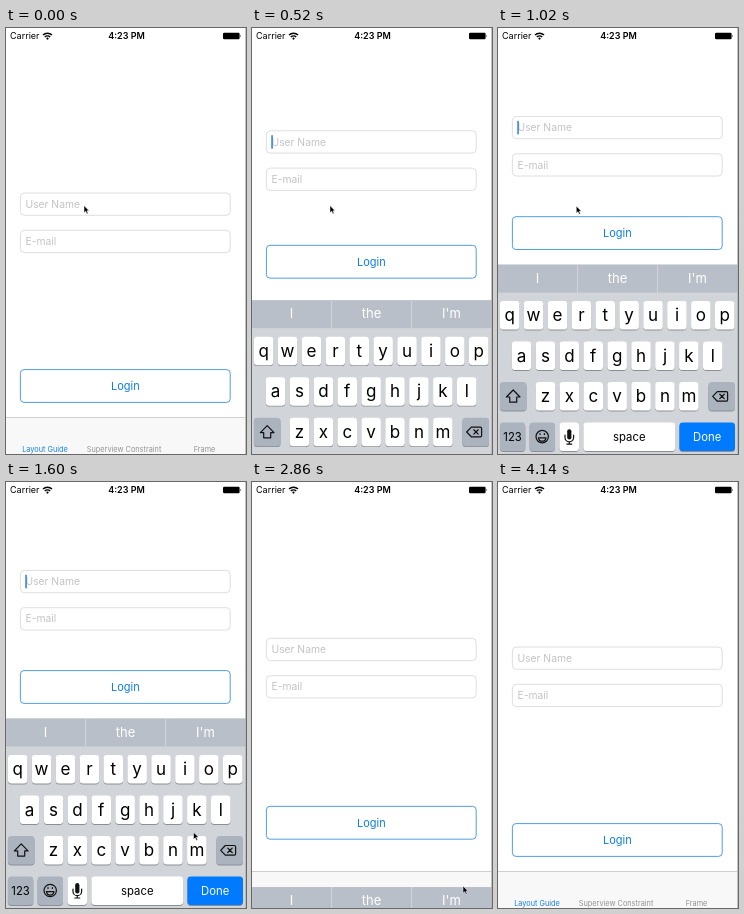
Write an HTML page that moves like this. It is 240x426 px and loops after 4.3 s.

```html
<!DOCTYPE html>
<html lang="en">
<head>
<meta charset="utf-8">
<title>Login form following the keyboard</title>
<style>
html, body { margin: 0; height: 100%; overflow: hidden; background: #fff; }
svg { display: block; width: 100vw; height: 100vh; font-family: Inter, Roboto, "Liberation Sans", sans-serif; }
.mid { text-anchor: middle; }
.hint { font-size: 10.3px; fill: #c3c3c8; }
.field { fill: #fff; stroke: #d6d6d6; stroke-width: .8; }
.tab { font-size: 7.35px; fill: #929292; }
.word { font-size: 13px; fill: #fff; }
.letter { font-size: 17px; }
.label { font-size: 11.3px; }
.icon { fill: none; stroke: #111; stroke-width: 1.2; stroke-linejoin: round; stroke-linecap: round; }
</style>
</head>
<body>
<svg viewBox="0 0 240 426">
  <rect width="240" height="426" fill="#fff"/>

  <!-- status bar -->
  <text x="4" y="11.2" font-size="9">Carrier</text>
  <g fill="none" stroke="#000" stroke-width="1.4">
    <path d="M37 7.1a6.3 6.3 0 0 1 9 0M38.8 9a3.8 3.8 0 0 1 5.4 0"/>
  </g>
  <circle cx="41.5" cy="10.6" r="1.1"/>
  <text class="mid" x="120.5" y="11.2" font-size="9" font-weight="600">4:23 PM</text>
  <rect x="217" y="4.7" width="16.6" height="6.6" rx="1.2"/>
  <path d="M234.2 6.7q1.4 1.3 0 2.6z"/>

  <!-- form -->
  <g id="fields">
    <rect class="field" x="14.4" y="165" width="209.8" height="22.3" rx="4"/>
    <text class="hint" x="19.5" y="179.8">User Name</text>
    <rect class="field" x="14.4" y="202.3" width="209.8" height="22.3" rx="4"/>
    <text class="hint" x="19.5" y="217.1">E-mail</text>
    <rect id="caret" x="19.3" y="169.4" width="1.5" height="13.5" fill="#2b7de0"/>
  </g>
  <g id="login">
    <rect x="14.4" y="341.6" width="209.8" height="32.8" rx="3.6" fill="#fff" stroke="#3c94e0" stroke-width=".9"/>
    <text class="mid" x="119.3" y="362" font-size="11" fill="#0f7ee0">Login</text>
  </g>

  <!-- tab bar -->
  <rect y="389" width="240" height="37" fill="#f8f8f8"/>
  <rect y="389" width="240" height=".7" fill="#bdbdbd"/>
  <g class="mid">
    <text class="tab" x="39" y="423.7" style="fill:#1a82e2">Layout Guide</text>
    <text class="tab" x="118" y="423.7">Superview Constraint</text>
    <text class="tab" x="198.5" y="423.7">Frame</text>
  </g>

  <g id="keyboard">
    <rect width="240" height="192" fill="#d1d5da"/>
    <rect width="240" height="28" fill="#b9bfc8"/>
    <path d="M79.6 0v28M159.6 0v28" stroke="#d3d7dc" stroke-width=".9"/>
    <g id="keys" class="mid"></g>
    <g class="icon">
      <path d="M15.2 125.4l-6.8 7h3.3v5.2h7v-5.2h3.3z"/>
      <path d="M219.3 127h9q1.3 0 1.3 1.3v7q0 1.3-1.3 1.3h-9l-4.6-4.8zM221.8 129.6l4.4 4.4m0-4.4l-4.4 4.4"/>
      <circle cx="44.2" cy="172" r="6.2"/>
      <path d="M40.4 173.2h7.6q-.6 3.4-3.8 3.4t-3.8-3.4zM42 169v1M46.4 169v1"/>
      <path d="M67 170.5v2.4a4.3 4.3 0 0 0 8.6 0v-2.4M71.3 177.3v2.2M68.8 179.5h5"/>
    </g>
    <rect x="69.2" y="164.6" width="4.2" height="10.4" rx="2.1" fill="#111"/>
  </g>

  <rect x="239.2" y="0" width=".8" height="426" fill="#b4b4b6"/>
  <path id="pointer" d="M0 0v7.2l1.7-1.5 1.2 2.6 1.2-.6-1.2-2.5h2.2z" fill="#000" stroke="#fff" stroke-width=".5"/>
</svg>
<script>
const LOOP = 4300, SHOW = 293, HIDE = 2584;
const $ = id => document.getElementById(id);
const clamp = v => Math.min(1, Math.max(0, v));

// Keyboard, in coordinates relative to its top edge
const rowY = r => 36.5 + 40.5 * r;
const text = (x, y, cls, s, fill = '#000') =>
  `<text class="${cls}" x="${x}" y="${y}" style="fill:${fill}">${s}</text>`;
const key = (x, row, w, fill = '#fff') =>
  `<rect x="${x}" y="${rowY(row) + .9}" width="${w}" height="28.5" rx="3.4" fill="#8b8f95"/>` +
  `<rect x="${x}" y="${rowY(row)}" width="${w}" height="28.5" rx="3.4" fill="${fill}"/>`;

const DARK = '#abb3be', BLUE = '#007aff';
let out = ['I', 'the', "I'm"].map((s, i) => text(39.5 + 80 * i, 18.2, 'word', s)).join('')
  .replaceAll('fill:#000', 'fill:#fff');
['qwertyuiop', 'asdfghjkl', 'zxcvbnm'].forEach((letters, r) => {
  const left = [1.9, 13.8, 37.7][r];
  [...letters].forEach((c, i) => {
    const x = left + 23.9 * i;
    out += key(x, r, 19.5) + text(x + 9.75, rowY(r) + 20, 'letter', c);
  });
});
out += key(1.9, 2, 26.6, DARK) + key(210.4, 2, 26.6, DARK);
out += key(1.9, 3, 25.4, DARK) + text(14.6, rowY(3) + 18.6, 'label', '123');
out += key(31.6, 3, 25.4, DARK) + key(61.5, 3, 19.5);
out += key(85.4, 3, 91.8) + text(131.3, rowY(3) + 18, 'label', 'space');
out += key(181.4, 3, 55.6, BLUE) + text(209.2, rowY(3) + 18.2, 'label', 'Done', '#fff');
$('keys').innerHTML = out;

// Critically damped spring from 0 to 1
function spring(ms) {
  const x = Math.max(0, ms) * .0135;
  return 1 - (1 + x) * Math.exp(-x);
}

const shift = (id, x, y) => $(id).setAttribute('transform', `translate(${x} ${y})`);

function draw(t) {
  const p = spring(t - SHOW) - spring(t - HIDE);
  shift('keyboard', 0, 426.5 - 190 * p);
  shift('login', 0, -153 * p);
  shift('fields', 0, -76.6 * p);

  const phase = t % 1000;
  const lit = t < 1000 || phase < 100 || phase > 450;
  $('caret').setAttribute('opacity', t > SHOW && t < HIDE && lit ? 1 : 0);

  const u = clamp((t - 1000) / 880), m = u * u * (3 - 2 * u);
  shift('pointer', 78 + 133 * m + 12 * Math.sin(Math.PI * m), 177.6 + 226.4 * m);
  $('pointer').setAttribute('opacity', 1 - clamp((t - 3920) / 220));
}

const start = performance.now();
function tick() {
  draw((performance.now() - start) % LOOP);
  requestAnimationFrame(tick);
}
tick();
</script>
</body>
</html>
```
